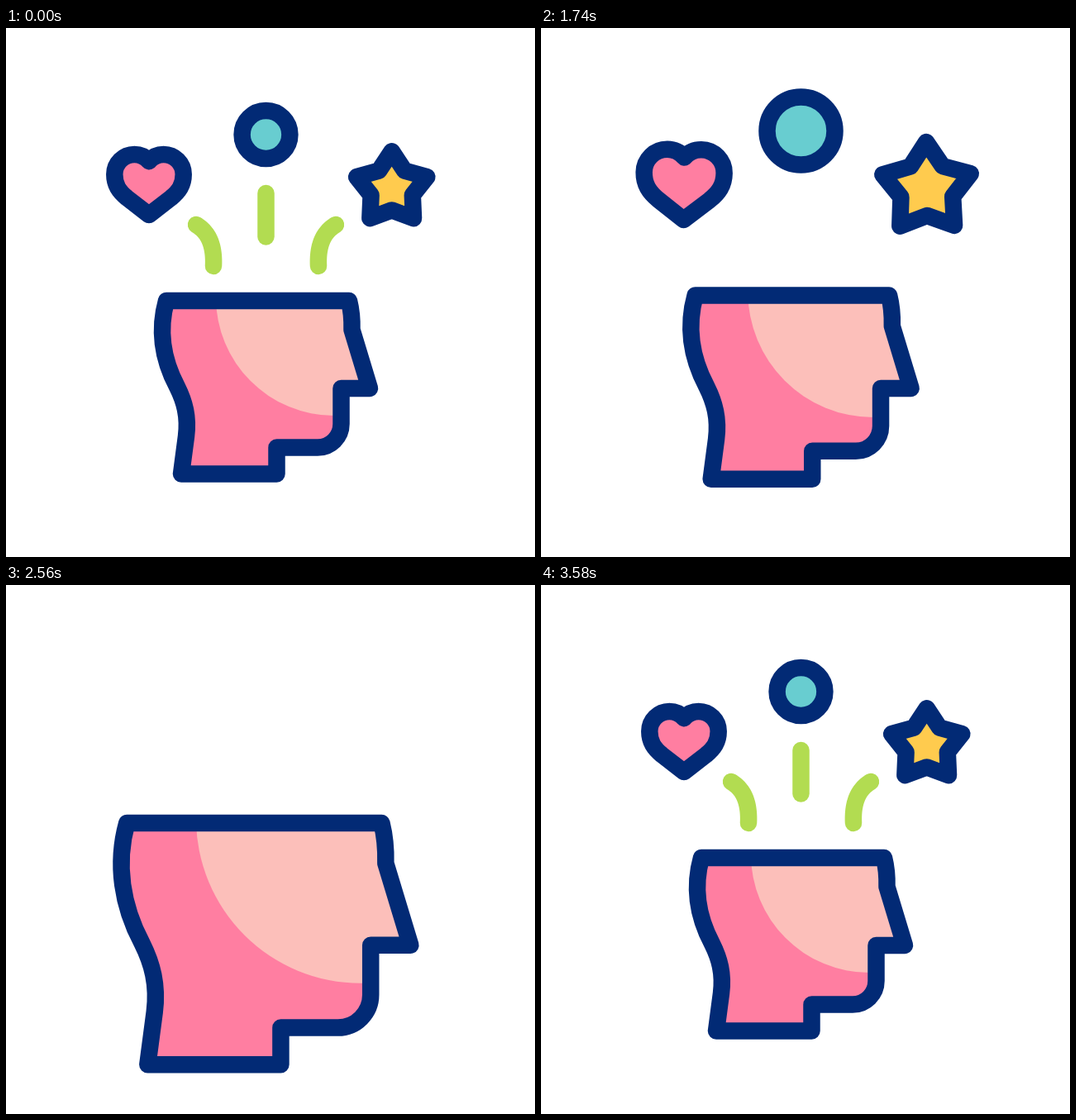
An HTML page with a canvas that plays this animation: 640x640 px, repeating every 3.6 s.

```html
<!DOCTYPE html>
<html lang="en">
<head>
<meta charset="utf-8">
<title>Ideas</title>
<style>
  html, body { margin: 0; width: 100%; height: 100%; overflow: hidden; background: #fff; }
  canvas { display: block; width: 640px; height: 640px; }
</style>
</head>
<body>
<canvas id="stage" width="640" height="640"></canvas>
<script>
const ctx = document.getElementById('stage').getContext('2d');
const LOOP = 3600, WEIGHT = 20.5;
const NAVY = '#022a75', PINK = '#ff7ea1', SKIN = '#fcbfba';
const TEAL = '#68cdd0', YELLOW = '#ffcb4e', GREEN = '#b2dc51';

const lerp = (a, b, p) => a + (b - a) * p;
const ease = u => u * u * (3 - 2 * u);

// Eased value of alternating time, value pairs
function track(t, ...keys) {
  if (t <= keys[0]) return keys[1];
  for (let i = 2; i < keys.length; i += 2) {
    if (t < keys[i]) {
      const u = (t - keys[i - 2]) / (keys[i] - keys[i - 2]);
      return lerp(keys[i - 1], keys[i + 1], ease(u));
    }
  }
  return keys[keys.length - 1];
}

function starPath(outer, inner) {
  const path = new Path2D();
  for (let i = 0; i < 10; i++) {
    const r = i % 2 ? inner : outer, a = i * Math.PI / 5;
    path.lineTo(r * Math.sin(a), -r * Math.cos(a));
  }
  path.closePath();
  return path;
}

const disc = new Path2D();
disc.arc(0, 0, 41, 0, 7);

const heart = new Path2D(`M0 42 L-31 18 C-42 9 -48.5 0 -48.5 -15 A28 28 0 0 1 -20.5 -43
  Q-8 -43 0 -33.5 Q8 -43 20.5 -43 A28 28 0 0 1 48.5 -15 C48.5 0 42 9 31 18 Z`);

const head = new Path2D(`M194 330 H415 Q419 346 418.5 365 L440 436 H405.5 V479
  A28.5 28.5 0 0 1 377 507.5 H327.5 V539.5 H212 L218 494
  C221 470 216 452 207 434 C190 402 184 366 194 330 Z`);

const glow = new Path2D();
glow.arc(397, 326, 143, 0, 7);

// dx, dy, shrink: change while dropping; turn: spin direction
const icons = [
  { path: heart, fill: PINK, x: 173, y: 190, rest: .86, dx: 37, dy: 92, shrink: .09, turn: -1 },
  { path: disc, fill: TEAL, x: 314.5, y: 129, rest: .705, dx: -5.5, dy: 146, shrink: .17, turn: 0 },
  { path: starPath(56, 33), fill: YELLOW, x: 466.7, y: 194, rest: .8, dx: -74, dy: 89, shrink: .3, turn: 1 }
];

function outline(scale) {
  ctx.lineWidth = WEIGHT / scale;
  ctx.strokeStyle = NAVY;
}

function drawIcon(icon, t) {
  if (t > 2390 && t < 2870) return;
  let { x, y } = icon, scale, angle;
  if (t < 2390) {
    const drop = Math.max(0, (t - 1930) / 350) ** 2.5;
    const swing = track(t, 600, 0, 930, -5, 1260, 5, 1590, -5, 1920, 5);
    x += icon.dx * drop;
    y += icon.dy * drop;
    if (!icon.turn) y += track(t, 550, 0, 880, -13, 1210, 5, 1540, -13, 1870, 0);
    scale = track(t, 80, icon.rest, 550, 1) - icon.shrink * drop;
    angle = swing + 14 * drop;
  } else {
    const left = track(t, 2870, 1, 3430, 0);
    x = lerp(x, 314, left);
    y = lerp(y, 370, left);
    scale = icon.rest * (1 - .5 * left);
    angle = track(t, 3330, 18, 3580, 0);
  }
  ctx.save();
  ctx.translate(x, y);
  ctx.rotate(angle * icon.turn * Math.PI / 180);
  ctx.scale(scale, scale);
  ctx.fillStyle = icon.fill;
  ctx.fill(icon.path);
  outline(scale);
  ctx.stroke(icon.path);
  ctx.restore();
}

function drawHead(scale) {
  ctx.save();
  ctx.translate(315, 436.5);
  ctx.scale(scale, scale);
  ctx.translate(-315, -436.5);
  ctx.fillStyle = PINK;
  ctx.fill(head);
  ctx.save();
  ctx.clip(head);
  ctx.fillStyle = SKIN;
  ctx.fill(glow);
  ctx.restore();
  outline(scale);
  ctx.stroke(head);
  ctx.restore();
}

// Part of a cubic curve between parameters from and to
function drawCurve(xs, ys, from, to) {
  const at = (v, u) => {
    const w = 1 - u;
    return w * w * w * v[0] + 3 * w * w * u * v[1] + 3 * w * u * u * v[2] + u * u * u * v[3];
  };
  ctx.beginPath();
  for (let i = 0; i <= 24; i++) {
    const u = lerp(from, to, i / 24);
    ctx.lineTo(at(xs, u), at(ys, u));
  }
  ctx.stroke();
}

function drawRays(t, headScale) {
  const from = t > 1500 ? track(t, 2700, 1, 2840, 0) : 0;
  const to = t > 1500 ? 1 : track(t, 300, 1, 870, 0);
  if (to - from < .005) return;
  const lift = Math.min(1, (headScale - 1) / .3);
  const mix = (low, high) => low.map((v, i) => lerp(v, high[i], lift));
  const side = mix([230, 247, 252, 251], [230, 243, 251, 251]);
  const sideY = mix([238, 248, 266, 288], [209, 217, 227, 239]);
  const midY = mix([200, 217.5, 235, 252.5], [181, 192, 203, 214]);
  ctx.lineWidth = WEIGHT;
  ctx.strokeStyle = GREEN;
  drawCurve(side, sideY, from, to);
  drawCurve(side.map(x => 629 - x), sideY, from, to);
  drawCurve([314.5, 314.5, 314.5, 314.5], midY, from, to);
}

function draw(t) {
  ctx.fillStyle = '#fff';
  ctx.fillRect(0, 0, 640, 640);
  ctx.lineCap = ctx.lineJoin = 'round';
  const headScale = track(t, 1500, 1, 2330, 1.3, 2640, 1.413, 2890, 1.3, 3520, 1);
  drawRays(t, headScale);
  icons.forEach(icon => drawIcon(icon, t));
  drawHead(headScale);
}

const start = performance.now();
function tick() {
  draw((performance.now() - start) % LOOP);
  requestAnimationFrame(tick);
}
tick();
</script>
</body>
</html>
```
